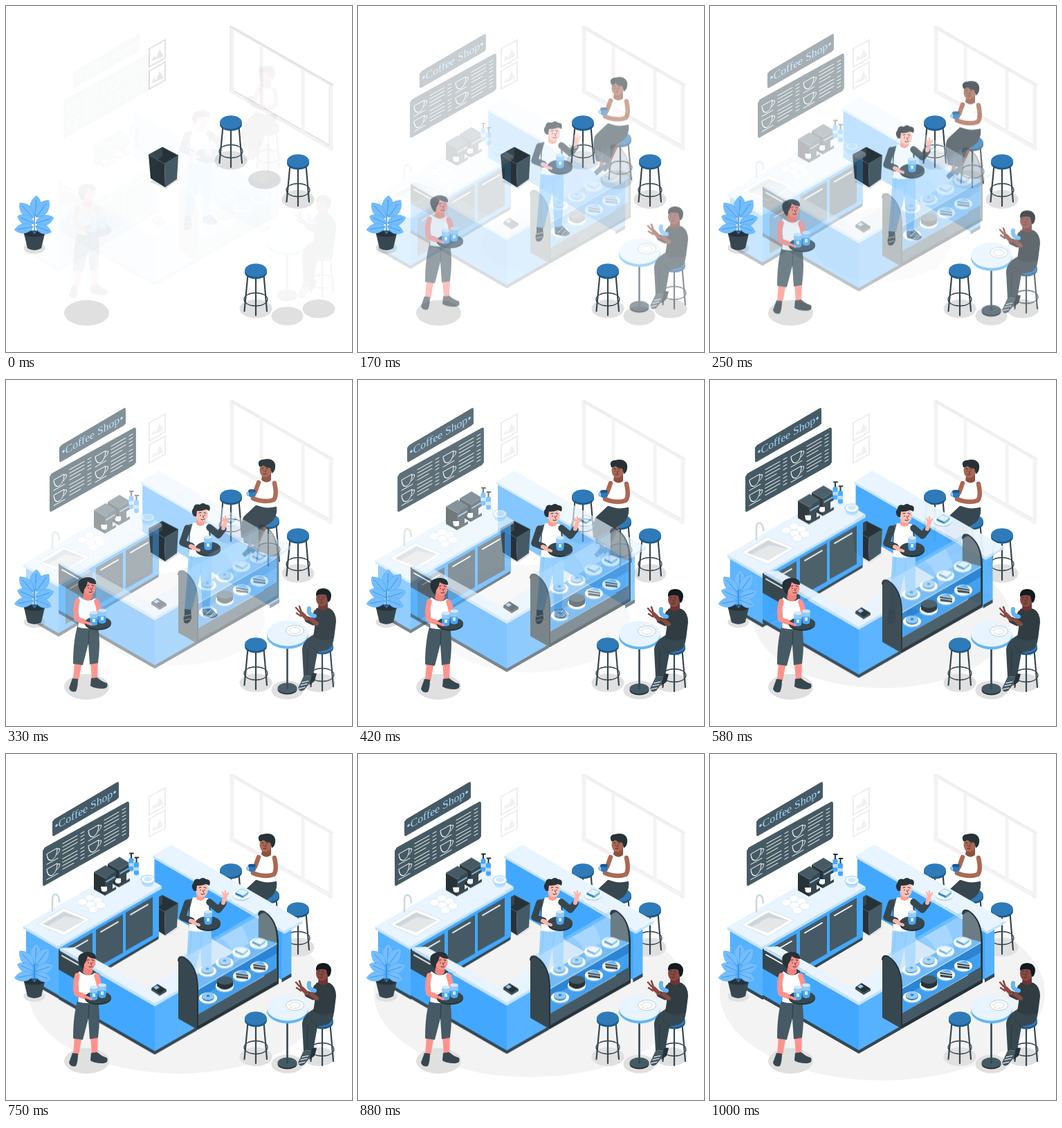
An HTML page without scripts that plays this animation: 500x500 px, repeating every 1040 ms.

```html
<!DOCTYPE html>
<html lang="en">
<head>
<meta charset="utf-8">
<title>Coffee shop</title>
<style>
html, body { margin: 0; width: 100%; height: 100%; overflow: hidden; background: #fff; }
svg { display: block; width: 100vw; height: 100vh; }
.signs, .slide, .drop, .floor, .shade { animation: 1040ms linear infinite; }
.signs { animation-name: signs; }
.slide { animation-name: slide; --x: 0px; --y: 0px; }
.drop { animation-name: drop; }
.floor { animation-name: grow; transform-origin: 249px 345px; }
.shade { animation-name: shade; }
.kitchen { --y: 1px; }
.bar { --x: -1px; }
.counter { --y: -1px; }
@keyframes signs {
  0% { transform: translate(30px); opacity: .03; }
  16.3% { transform: translate(22px); opacity: .3; }
  31.7% { transform: translate(10px); opacity: .67; }
  40.4% { transform: translate(4px); opacity: .87; }
  50% { transform: translate(-1px); opacity: 1; }
  55.8% { transform: translate(-2px); }
  72.1%, 100% { transform: none; opacity: 1; }
}
@keyframes slide {
  0% { transform: translate(calc(var(--x)*28.5), calc(var(--y)*28.5)); opacity: .02; }
  16.3% { transform: translate(calc(var(--x)*25), calc(var(--y)*25)); opacity: .18; }
  31.7% { transform: translate(calc(var(--x)*16), calc(var(--y)*16)); opacity: .47; }
  40.4% { transform: translate(calc(var(--x)*11), calc(var(--y)*11)); opacity: .65; }
  55.8% { transform: translate(calc(var(--x)*2.5), calc(var(--y)*2.5)); opacity: .96; }
  63% { transform: translate(calc(var(--x)*-.6), calc(var(--y)*-.6)); opacity: 1; }
  72.1% { transform: translate(calc(var(--x)*-1.4), calc(var(--y)*-1.4)); }
  90%, 100% { transform: none; opacity: 1; }
}
@keyframes drop {
  0% { transform: translateY(-29px); opacity: .05; }
  16.3% { transform: translateY(-12.5px); opacity: .57; }
  31.7% { transform: translateY(-1px); opacity: .96; }
  40.4%, 100% { transform: none; opacity: 1; }
}
@keyframes grow {
  0% { transform: scale(.04); opacity: 0; }
  16.3% { transform: scale(.3); opacity: .2; }
  31.7% { transform: scale(.53); opacity: .5; }
  40.4% { transform: scale(.61); opacity: .6; }
  55.8% { transform: scale(.79); opacity: .95; }
  72.1% { transform: scale(.92); opacity: 1; }
  96%, 100% { transform: none; }
}
@keyframes shade {
  0%, 3.8% { color: #e2e2e2; }
  3.9%, 100% { color: #eee; }
}
.line { fill: none; stroke-linecap: round; stroke-linejoin: round; }
.dk { fill: #37474f; }
.mid { fill: #455a64; }
.blk { fill: #263238; }
.blue { fill: #42a8ff; }
.side { fill: #56b2ff; }
.pale { fill: #e8f4ff; }
.edge { fill: #c3e2ff; }
.wh { fill: #fff; }
</style>
</head>
<body>
<svg viewBox="0 0 500 500" xmlns="http://www.w3.org/2000/svg">
<defs>
  <g id="stool">
    <g class="line" stroke="#37474f" stroke-width="2.2">
      <path d="M-11.5 6L-16.5 59M0 8V65M11.5 6L16 59"/>
      <ellipse cy="42" rx="17" ry="9.500" stroke-width="1.3"/>
    </g>
    <path d="M-16 0V3A16 9.500 0 0 0 16 3V0Z" fill="#1e5788"/>
    <ellipse rx="16" ry="9.700" fill="#2f7ab8"/>
  </g>
  <g id="frame">
    <path d="M207 62L230 49V75L207 88Z" fill="none" stroke="currentColor" stroke-width="2"/>
    <path d="M210 80L214 72L217 75L222 62L227 71V73Z" fill="currentColor" opacity=".8"/>
  </g>
  <g id="menu" class="line" stroke="#fff" stroke-width="1">
    <path d="M-8 -5H7Q7 7 0 8Q-7 7 -8 -5ZM7 -3Q12 -4 10 1Q8 4 5 4M-8 10H8"/>
    <path d="M15 -7H36M15 -2H36M15 3H36M15 8H31M41 -7H46M41 -2H46M41 3H46M41 8H46"/>
  </g>
  <g id="door">
    <path class="mid" d="M0 0L39 -22.5V33L0 55Z"/>
    <path class="line" d="M7 3L32 -11.5" stroke="#fff" stroke-width="1.8"/>
  </g>
  <g id="machine">
    <path class="blk" d="M0 9L16 18V43L0 34Z"/>
    <path class="dk" d="M16 18L32 8V20L27 23V33L32 30V34L16 43Z"/>
    <path class="mid" d="M0 9L17 -1L32 8L16 18Z"/>
    <path class="line" d="M18 23L30 16" stroke="#90caf9" stroke-width="1.5"/>
    <path class="wh" d="M10 30H19V36Q15 39 11 36Z"/>
  </g>
  <g id="bottle">
    <path d="M-3.5 0Q0 -4 3.5 0V16Q0 19 -3.5 16Z" fill="#42a8ff"/>
    <path class="line" d="M0 -2V-7M-2 -8H3" stroke="#263238" stroke-width="2"/>
    <path d="M-3.5 6H3.5V11H-3.5Z" fill="#b5dcff"/>
  </g>
  <g id="plate">
    <ellipse cy="1" rx="13" ry="8" fill="#90caf9"/>
    <ellipse rx="13" ry="7.700" class="wh"/>
    <ellipse rx="9" ry="5" fill="#dbeeff"/>
  </g>
  <g id="toast">
    <use href="#plate"/>
    <path d="M-9 0L2 5V2L-9 -3Z" fill="#2f7ab8"/>
    <path d="M2 5L10 -1V-4L2 2Z" fill="#56b2ff"/>
    <path class="pale" d="M-9 -3L0 -8L10 -4L2 2Z" stroke="#64b5f6" stroke-width=".7"/>
  </g>
  <g id="slice">
    <use href="#plate"/>
    <path class="dk" d="M-9 -4L9 -1V5L-8 3Z"/>
    <path d="M-9 -1L9 1.5" stroke="#fff"/>
    <path d="M-9 -5L4 -8L9 -2Z" fill="#64b5f6"/>
  </g>
  <g id="donut">
    <use href="#plate"/>
    <ellipse cy="-1" rx="9" ry="6" fill="#2f7ab8"/>
    <ellipse cy="-2.500" rx="9" ry="5.500" fill="#90caf9"/>
    <ellipse cy="-3" rx="2.500" ry="1.500" fill="#2f7ab8"/>
  </g>
  <g id="glass">
    <path d="M-6 -9L-5 8Q0 11 5 8L6 -9Z" fill="#90caf9"/>
    <path d="M-5.4 -1L-5 8Q0 11 5 8L5.4 -1Z" fill="#42a8ff"/>
    <ellipse cy="-9" rx="6" ry="2.600" fill="#cfe8ff"/>
    <path d="M-2 0H2V5H-2Z" fill="#dbeeff"/>
  </g>
  <g id="face" class="line" stroke="#263238" stroke-width="1">
    <path d="M-4 -4L-1 -4.5M3 -4.5L6 -3.5M-2 -1V0M4 -1V0M1.5 0L2.5 3M-1 5.5Q1.5 7 4 5"/>
  </g>
  <path id="arch" d="M249 316V297Q250 289 258 293Q276 305 277 335V397L249 381Z"/>
  <g id="leaf">
    <path d="M0 0C-12 -7 -10 -22 0 -30C10 -22 12 -7 0 0Z" stroke="#4ba6f2" stroke-width=".6"/>
    <path class="line" d="M0 0V-24" stroke="#2f8fe0" stroke-width=".8"/>
  </g>
</defs>

<g class="shade">
  <g class="line" stroke="currentColor" style="stroke-linecap:butt">
    <path d="M327 31V124L470 206V114ZM369 56V148M429 90V182" stroke="#f3f3f3" stroke-width="5"/>
    <path d="M324 29.5L473 114.5" stroke-width="2.5"/>
    <path d="M330 123L366 143M372 147L426 178M432 181L467 201" stroke-width="1.6"/>
    <path d="M324 30V125M467 116V202" stroke-width="1"/>
  </g>
  <use href="#frame"/><use href="#frame" y="32"/>
</g>

<ellipse class="floor" cx="249" cy="345" rx="235" ry="127" fill="#f3f3f3"/>
<g fill="#e0e0e0">
  <ellipse cx="325" cy="223" rx="23.5" ry="13.5"/>
  <ellipse cx="373.5" cy="251" rx="23.5" ry="13.5"/>
  <ellipse cx="422" cy="279.5" rx="23.5" ry="13.5"/>
  <ellipse cx="361" cy="437.5" rx="23.5" ry="13.5"/>
  <ellipse cx="406.5" cy="448" rx="23" ry="13.5"/>
  <ellipse cx="452" cy="437.5" rx="23.5" ry="13.5"/>
  <ellipse cx="116.5" cy="443.5" rx="32.5" ry="18.5"/>
  <ellipse cx="41" cy="350" rx="15.5" ry="8"/>
</g>

<g class="signs">
  <path class="mid" d="M70 94L160 41Q163 39 163 43V63L160 66L70 118Q67 120 67 116V98Z"/>
  <text transform="translate(115 84.5) skewY(-29.7)" text-anchor="middle" font-family="'Liberation Serif', 'Noto Serif', serif" font-size="15.7" fill="#a5d5ff">•Coffee Shop•</text>
  <path class="mid" d="M56 135L175 69Q178 68 178 72V119L175 123L56 190Q53 192 53 187V140Z"/>
  <g transform="translate(53 137) skewY(-29.5)">
    <use href="#menu" x="14" y="16"/><use href="#menu" x="14" y="38"/>
    <use href="#menu" x="74" y="16"/><use href="#menu" x="74" y="38"/>
  </g>
</g>

<use href="#stool" x="325" y="168"/>
<use href="#stool" x="422" y="224"/>

<!-- seated woman -->
<g class="drop">
  <use href="#stool" x="379" y="204"/>
  <path class="line" d="M357 212L352 243M374 212L361 240" stroke="#a5624f" stroke-width="6"/>
  <path class="dk" d="M361 182L391 184Q393 197 384 206L372 214L362 241L352 237L355 213L351 238L344 236Q337 206 344 198Z"/>
  <path class="mid" d="M351 246L360 238L368 240L357 252ZM341 252L350 243L356 248L345 257Z"/>
  <path class="wh" d="M366 143L386 144Q393 152 390 184Q374 188 361 181L366 166L360 152Z"/>
  <path class="line" d="M388 150Q392 168 387 174Q374 179 357 172M365 149L360 163L354 167" stroke="#ab6852" stroke-width="6.5"/>
  <path d="M371 134H383V146Q376 152 369 145Z" fill="#8f5140"/>
  <ellipse cx="375" cy="131" rx="8.500" ry="10.500" fill="#ab6852"/>
  <path class="blk" d="M366 126Q362 117 371 116Q386 112 389 123Q390 133 384 136L382 128Q376 128 372 124Q369 127 366 126Z"/>
  <use href="#face" transform="translate(373 132) scale(.85)"/>
  <path d="M350 161H361V168Q356 173 351 168Z" fill="#2f7ab8"/>
  <ellipse cx="355.5" cy="161" rx="5.5" ry="2.3" fill="#1e5788"/>
  <path class="line" d="M350 163Q346 165 350 168" stroke="#42a8ff" stroke-width="1.5"/>
</g>

<g class="slide bar">
  <path class="blue" d="M213 149L400 258V328L213 219Z"/>
  <path class="side" d="M397 258L411 250V321L397 329Z"/>
  <path class="dk" d="M397 325L411 317V322L397 330Z"/>
  <path class="pale" d="M211 147L237 131L427 241L401 256.5Z"/>
  <path class="edge" d="M211 147L401 256.5V260L211 150.5ZM401 256.5L427 241V244.5L401 260Z"/>
  <use href="#toast" x="339" y="203"/>
</g>

<!-- bin -->
<path d="M208 254L231 264L250 251L230 240Z" fill="#e0e0e0"/>
<path class="blk" d="M206 215L229 228L230 262L209 249Z"/>
<path class="mid" d="M229 228L249 216L247 250L230 262Z"/>
<path class="blk" d="M206 215L226 204L249 216L229 228Z" stroke="#455a64"/>
<path class="dk" d="M207 215L226 205V217L219 222Z"/>

<g class="slide kitchen">
  <path class="side" d="M29 254L76 281V353L29 326Z"/>
  <path class="blue" d="M76 281L221 197V268L76 353Z"/>
  <path class="dk" d="M29 323L76 350L220 265V269L76 355L29 328Z"/>
  <use href="#door" x="86" y="282"/><use href="#door" x="130" y="255.5"/><use href="#door" x="173" y="230.5"/>
  <path class="pale" d="M25 250L175 163L225 192L75 279Z"/>
  <path class="edge" d="M25 250L75 279L225 192V196L75 283L25 254Z"/>
  <path class="wh" d="M45 247L83 224L122 240L84 264Z" stroke="#d6e4ef"/>
  <path d="M53 247L84 229L114 241L84 258Z" fill="#cfd6db"/>
  <path d="M60 250L85 236L114 241L84 258Z" fill="#e4e7e9"/>
  <path class="line" d="M67 228V211Q67 204 72 204Q77 206 77 215" stroke="#cfd8dc" stroke-width="2.6"/>
  <g class="wh" stroke="#d6e4ef" stroke-width=".7">
    <ellipse cx="121" cy="209" rx="7" ry="5"/><ellipse cx="132" cy="213" rx="7" ry="5"/>
    <ellipse cx="110" cy="215" rx="7" ry="5"/><ellipse cx="137" cy="220" rx="7" ry="5"/>
    <ellipse cx="122" cy="219" rx="7" ry="5"/><ellipse cx="126" cy="226" rx="7" ry="5"/>
  </g>
  <use href="#machine" x="147" y="151"/><use href="#machine" x="127" y="163"/>
  <use href="#bottle" x="181" y="153"/><use href="#bottle" x="188.5" y="159"/>
  <path d="M195 183Q196 193 205 193Q214 193 215 183Z" fill="#b5dcff"/>
  <ellipse cx="205" cy="182.5" rx="10" ry="6" class="wh" stroke="#90caf9"/>
  <ellipse cx="205" cy="182" rx="6" ry="3.4" fill="#cfe8ff"/>
</g>

<!-- plant -->
<path class="dk" d="M26 329Q41 337 56 329L51 350Q41 356 31 350Z"/>
<ellipse cx="41" cy="329" rx="15" ry="4.5" class="blk"/>
<path class="line" d="M41 329V300M41 329L28 312M41 329L55 313" stroke="#2f7ab8" stroke-width="1.2"/>
<g fill="#74bdff">
  <use href="#leaf" transform="translate(42 304) rotate(4)"/>
  <use href="#leaf" transform="translate(39 306) rotate(-42) scale(.95)"/>
  <use href="#leaf" transform="translate(44 305) rotate(36)"/>
  <use href="#leaf" transform="translate(40 314) rotate(-66) scale(.85)"/>
  <use href="#leaf" transform="translate(43 314) rotate(72) scale(.9)"/>
  <use href="#leaf" transform="translate(39 319) rotate(-100) scale(.85 .9)"/>
  <use href="#leaf" transform="translate(43 318) rotate(112) scale(.8)"/>
</g>

<!-- waiter -->
<g class="drop">
  <path class="mid" d="M258 332L267 330L268 345Q265 355 258 352Q255 346 258 340ZM284 331L294 329L306 340Q305 345 296 345L285 342Z"/>
  <path class="line" d="M258 348L266 346M258 342L267 340M289 340L296 333M295 343L300 337" stroke="#fff"/>
  <path d="M264 250L296 250Q299 282 294 331L284 332L281 281L269 333L258 332Q262 290 264 250Z" fill="#98d0ff"/>
  <path class="line" d="M281 281L283 262M269 252Q264 290 264 326" stroke="#7fc0fa" stroke-width=".8"/>
  <path class="mid" d="M264 210Q279 205 295 210L297 252Q280 258 264 252Z"/>
  <path class="wh" d="M270 207L292 208L296 254Q280 259 264 255L266 222Z"/>
  <path class="line" d="M262 215L255 236L268 241M294 214L307 225L314 216" stroke="#37474f" stroke-width="9.5"/>
  <path class="line" d="M267 241L276 245M314 215L317 205" stroke="#ffb5aa" stroke-width="6"/>
  <path class="line" d="M315 205L313 200M317 204V198M319 205L321 201" stroke="#ffb5aa" stroke-width="2.5"/>
  <path d="M275 200H287V209Q281 215 275 209Z" fill="#ff9d92"/>
  <ellipse cx="283" cy="196" rx="9" ry="11" fill="#ffc0b6"/>
  <path class="blk" d="M272 198Q266 192 271 186Q272 179 280 181Q285 177 289 181Q297 181 294 190L289 188Q281 191 276 190L275 198Z"/>
  <use href="#face" x="283" y="197"/>
  <ellipse cx="292" cy="246" rx="18" ry="10" class="blk"/>
  <ellipse cx="292" cy="244" rx="18" ry="9.6" class="dk"/>
  <use href="#glass" x="292" y="237"/>
  <path class="line" d="M270 244L279 247" stroke="#ffb5aa" stroke-width="4"/>
</g>

<g class="slide counter">
  <path class="blue" d="M76 283L215 363V432L76 352Z"/>
  <path class="side" d="M215 363L275 328V397L215 432Z"/>
  <path class="dk" d="M76 348L215 428L276 393V398L215 433L76 353Z"/>
  <path class="dk" d="M76 281L130 312V341L76 310Z"/>
  <path class="line" d="M81 290L104 303" stroke="#fff" stroke-width="1.8"/>
  <path class="pale" d="M78 279L98 278L205 337L250 311L274 325L215 359Z"/>
  <path class="edge" d="M78 279L215 359L274 325V329L215 363L78 283Z"/>
  <path class="blk" d="M210 337L219 331L232 339L222 346Z"/>
  <path class="dk" d="M210 337L222 346V348L210 340ZM222 346L232 339V342L222 348Z"/>
  <path d="M213 336L218 333L222 336L217 339Z" fill="#90caf9"/>

  <!-- display case -->
  <use href="#arch" x="116" y="-66" fill="#37474f"/>
  <path d="M252 292L364 227V267L268 322Z" fill="#9ed2ff" opacity=".45"/>
  <path d="M270 320L365 264L393 272L277 339Z" fill="#42a0f0"/>
  <path d="M277 339L391 273V308L277 375Z" fill="#2c84d4"/>
  <path d="M277 352L391 287V308L277 375Z" fill="#42a0f0"/>
  <use href="#donut" x="291" y="312"/><use href="#donut" x="316" y="300"/>
  <use href="#toast" x="340" y="285"/><use href="#toast" x="365" y="272"/>
  <path class="line" d="M277 339L391 273" stroke="#b5dcff" stroke-width="1.3"/>
  <use href="#donut" x="292" y="351"/>
  <use href="#plate" x="316" y="334"/>
  <path class="blk" d="M305 326V334Q316 344 328 334V326Z"/>
  <ellipse cx="316.5" cy="326" rx="11.5" ry="6" class="mid"/>
  <use href="#slice" x="341" y="319"/><use href="#slice" x="366" y="306"/>
  <path class="mid" d="M277 375L393 308V331L277 397Z"/>
  <path class="blk" d="M277 392L393 326V331L277 397Z"/>
  <path d="M258 293L374 227Q392 239 391 273L277 339Q277 306 258 293Z" fill="#e8f4ff" opacity=".3"/>
  <path d="M310 264L340 247Q351 260 353 287L330 301Q329 276 310 264Z" fill="#fff" opacity=".2"/>
  <use href="#arch" fill="#37474f"/>
  <path class="line" d="M249 297Q250 289 258 293Q276 305 277 335V396M365 231Q366 223 374 227Q392 239 393 269V330" stroke="#263238" stroke-width="2"/>
</g>

<!-- customer with tray -->
<g class="drop">
  <path d="M99 408H110L105 435H97ZM122 408H133L132 434H124Z" fill="#ff938c"/>
  <path class="dk" d="M96 432L104 433Q104 445 101 451Q93 453 91 446ZM123 432L132 431Q137 436 146 439Q149 446 140 447Q128 447 122 443Z"/>
  <path class="mid" d="M104 354L133 357Q137 380 133 410L121 412L119 382L111 413L97 411Q97 376 104 354Z"/>
  <path class="line" d="M119 382L120 363" stroke="#263238" stroke-width=".8"/>
  <path class="wh" d="M106 314Q118 324 129 316Q136 327 134 358Q116 362 104 358Q108 338 101 321Z"/>
  <path class="line" d="M103 320Q99 335 102 346L120 353M131 321Q136 333 134 340" stroke="#ff938c" stroke-width="7.5"/>
  <path class="blk" d="M106 303Q101 292 110 288Q118 284 125 288L117 312Q109 311 106 303Z"/>
  <path d="M113 304H125V316Q119 323 111 316Z" fill="#f5827c"/>
  <ellipse cx="121" cy="301" rx="8.5" ry="10.5" fill="#ff938c"/>
  <path class="blk" d="M110 304Q107 287 119 286Q131 287 130 296Q123 296 118 292Q117 299 112 305Z"/>
  <use href="#face" x="121" y="302"/>
  <ellipse cx="133" cy="353" rx="19" ry="9.5" class="blk"/>
  <ellipse cx="133" cy="351.5" rx="19" ry="9" class="dk"/>
  <use href="#glass" x="127" y="346"/><use href="#glass" x="139" y="343"/>
  <path class="line" d="M115 351L123 354" stroke="#ff938c" stroke-width="4"/>
</g>

<use href="#stool" x="361" y="382"/>

<!-- table and seated man -->
<g class="drop">
  <use href="#stool" x="457" y="385"/>
  <ellipse cx="406.5" cy="448" rx="14" ry="7.5" class="blk"/>
  <ellipse cx="406.5" cy="446" rx="14" ry="7.5" class="mid"/>
  <path class="line" d="M406.5 380V446" stroke="#37474f" stroke-width="2.6"/>
  <path d="M377 367V371A30 18.5 0 0 0 437 371V367Z" fill="#64b5f6"/>
  <ellipse cx="407" cy="367" rx="30" ry="18.5" class="pale"/>
  <ellipse cx="417.5" cy="363" rx="13" ry="7.5" class="wh" stroke="#b8cad8"/>
  <ellipse cx="417.5" cy="363" rx="8" ry="4.5" fill="none" stroke="#cfd8dc"/>
  <path class="dk" d="M446 368L474 369Q474 387 464 391L450 394L444 428L430 429L428 391Q428 377 446 368Z"/>
  <path class="line" d="M441 385L450 394M436 391L435 426" stroke="#263238" stroke-width=".8"/>
  <path class="mid" d="M430 429L441 428L442 435L431 449Q424 453 422 446Z"/>
  <path class="blk" d="M443 424L449 425L446 436L438 442Z"/>
  <path class="line" d="M423 447L432 445M428 438L437 436M426 442L435 440" stroke="#fff" stroke-width="1.2"/>
  <path fill="#303c42" d="M448 331Q458 327 468 331Q477 336 477 350L474 374Q458 380 444 372L447 352Z"/>
  <path class="line" d="M469 339L465 360L450 354M449 337L444 351L436 347" stroke="#303c42" stroke-width="9"/>
  <path class="line" d="M449 353L441 347M435 346L428 339" stroke="#8a4840" stroke-width="6"/>
  <path class="line" d="M428 340L419 330M427 337L424 328M426 342L420 338" stroke="#8a4840" stroke-width="2.5"/>
  <path class="line" d="M438 331Q436 340 446 342" stroke="#64b5f6" stroke-width="6"/>
  <path d="M452 322H465V331Q458 337 451 331Z" fill="#6d342f"/>
  <ellipse cx="457" cy="317" rx="9" ry="11" fill="#8a4840"/>
  <path fill="#111a1e" d="M448 313Q447 302 459 302Q470 303 470 313Q469 322 465 322L463 312Q455 309 448 313Z"/>
  <use href="#face" transform="translate(454 318) scale(.9)"/>
</g>
</svg>
</body>
</html>
```
